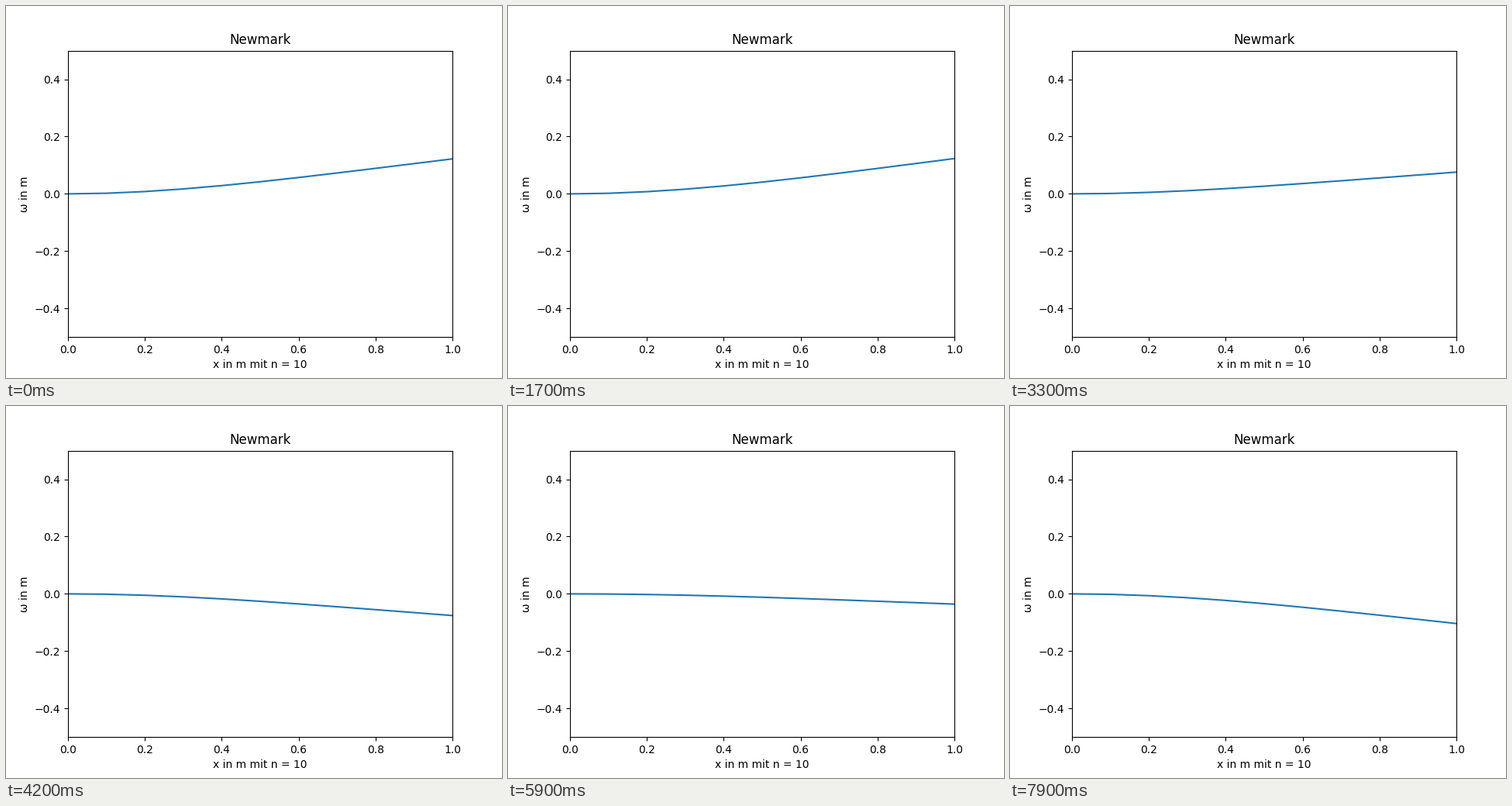
A matplotlib script that plays this animation: 640x480 px, repeating every 8 s.

```python
"""Free vibration of a clamped beam, integrated with the Newmark method."""
import numpy as np
import matplotlib.pyplot as plt
from matplotlib.animation import FuncAnimation

N = 10                    # beam elements
LENGTH = 1.0
EI, MU, LOAD = 1.0, 1.0, 1.0
DT, STEPS = 0.1, 80
BETA, GAMMA = 0.25, 0.5


def assemble():
    """Mass, stiffness and load of the beam without the clamped node."""
    h = LENGTH / N
    k = EI / h**3 * np.array([[12, 6*h, -12, 6*h],
                              [6*h, 4*h*h, -6*h, 2*h*h],
                              [-12, -6*h, 12, -6*h],
                              [6*h, 2*h*h, -6*h, 4*h*h]])
    m = MU * h / 420 * np.array([[156, 22*h, 54, -13*h],
                                 [22*h, 4*h*h, 13*h, -3*h*h],
                                 [54, 13*h, 156, -22*h],
                                 [-13*h, -3*h*h, -22*h, 4*h*h]])
    q = LOAD * h / 12 * np.array([6, h, 6, -h])

    size = 2 * (N + 1)
    M, K, f = np.zeros((size, size)), np.zeros((size, size)), np.zeros(size)
    for e in range(N):
        dofs = slice(2 * e, 2 * e + 4)
        M[dofs, dofs] += m
        K[dofs, dofs] += k
        f[dofs] += q
    return M[2:, 2:], K[2:, 2:], f[2:]


def simulate():
    """Nodal deflections after each step, released from the loaded shape."""
    M, K, f = assemble()
    u = np.linalg.solve(K, f)
    v, a = np.zeros_like(u), np.zeros_like(u)
    A = M + BETA * DT**2 * K
    shapes = np.zeros((STEPS, N + 1))
    for i in range(STEPS):
        u_pred = u + DT * v + (0.5 - BETA) * DT**2 * a
        v_pred = v + (1 - GAMMA) * DT * a
        a = np.linalg.solve(A, -K @ u_pred)
        u = u_pred + BETA * DT**2 * a
        v = v_pred + GAMMA * DT * a
        shapes[i, 1:] = u[::2]
    return shapes


x = np.linspace(0, LENGTH, N + 1)
shapes = simulate()

fig, ax = plt.subplots(figsize=(6.4, 4.8), dpi=100)
ax.set(xlim=(0, LENGTH), ylim=(-0.5, 0.5), title="Newmark",
       xlabel=f"x in m mit n = {N}", ylabel="ω in m")
line, = ax.plot(x, shapes[0])


def update(i):
    line.set_ydata(shapes[i])
    return line,


anim = FuncAnimation(fig, update, frames=STEPS, interval=100,
                     repeat=True, repeat_delay=0)
plt.show()
```
